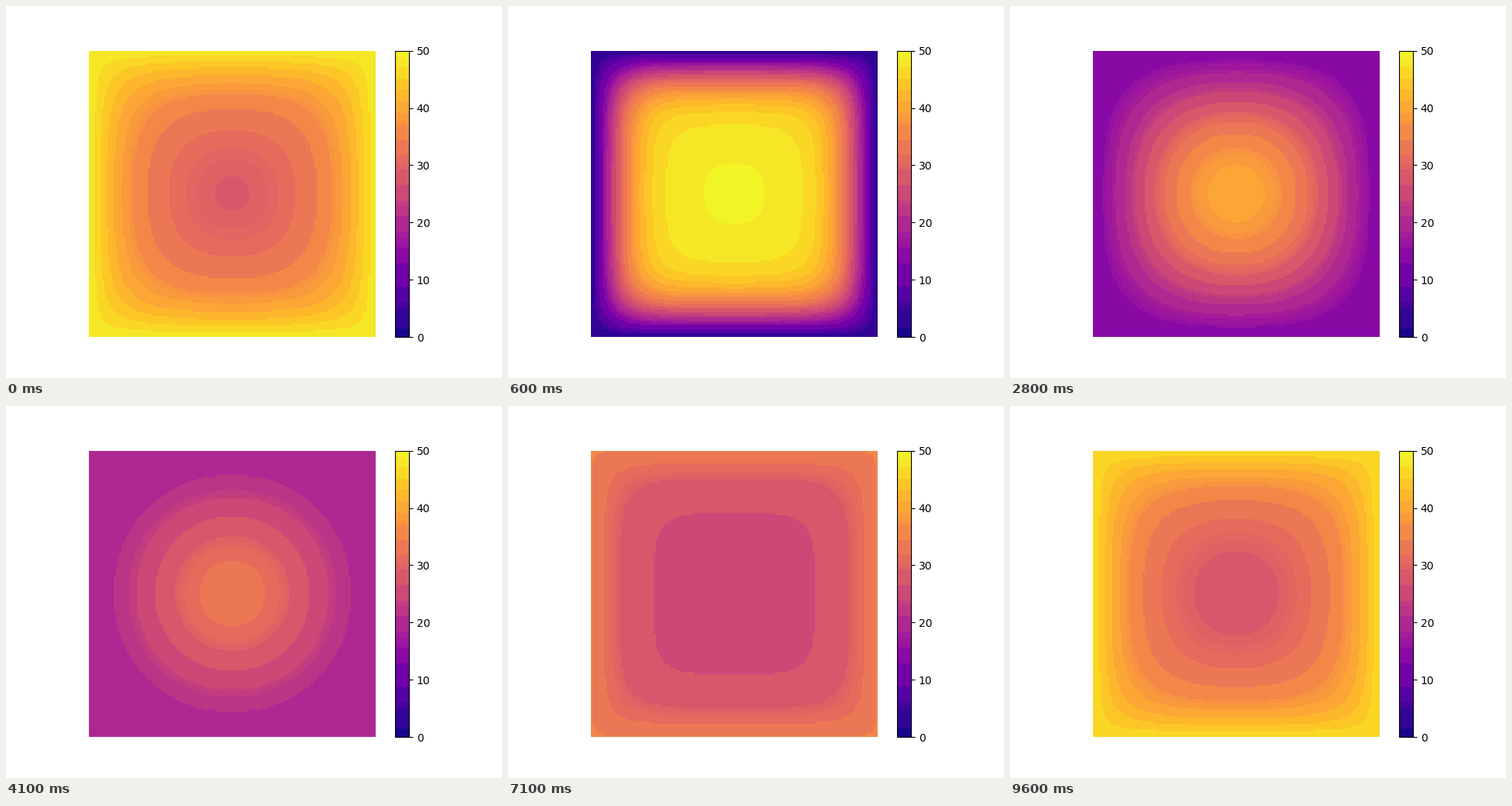
Animation, 640 px wide and 480 px high, one loop 9700 ms. Source, as a matplotlib script:

```python
import numpy as np
import matplotlib.pyplot as plt
from matplotlib.animation import FuncAnimation
from matplotlib.colors import ListedColormap

FRAMES, STEP_MS = 97, 100
CELLS = 150
HOT = 50.0
RAMP = HOT / 102      # rise of the edge temperature per step
DIFF = 0.00113        # diffusivity in plate widths squared per step
DOME = 0.11           # share of the heat that starts as a rounded dome
DOME_AGE = 22         # steps the dome has already diffused

plt.rcParams["font.family"] = "DejaVu Sans"

# Odd sine modes of the square plate
modes = np.arange(1, 100, 2)
x = np.linspace(0, 1, CELLS)
basis = np.sin(np.pi * np.outer(x, modes))
weight = 16 / (np.pi**2 * np.outer(modes, modes))
decay = DIFF * np.pi**2 * (modes[:, None]**2 + modes[None, :]**2)
start = HOT * weight * (1 - DOME + DOME * np.exp(-decay * DOME_AGE))


def plate(step):
    """Temperature of a hot plate whose edge warms up linearly from zero."""
    fade = np.exp(-decay * step)
    lag = RAMP * weight * (1 - fade) / decay
    return RAMP * step + basis @ (start * fade - lag) @ basis.T


def banded_plasma():
    """Plasma in flat bands: shades that share their leading bits merge."""
    rgb = plt.get_cmap("plasma")(np.arange(256))[:, :3]
    keys = (rgb * 255).astype(int) // (32, 16, 32)
    _, band = np.unique(keys, axis=0, return_inverse=True)
    band = band.ravel()
    means = np.array([rgb[band == n].mean(axis=0)
                      for n in range(band.max() + 1)])
    return ListedColormap(means[band])


fig, ax = plt.subplots(figsize=(6.4, 4.8), dpi=100)
image = ax.imshow(plate(1), cmap=banded_plasma(), vmin=0, vmax=HOT,
                  interpolation="nearest")
ax.axis("off")
fig.colorbar(image, ax=ax, ticks=range(0, 51, 10))


def update(i):
    # The loop opens on its hottest edge, then starts over
    image.set_data(plate((i or 100) - 0.5))
    return image,


anim = FuncAnimation(fig, update, frames=FRAMES, interval=STEP_MS,
                     repeat=True, repeat_delay=0)
plt.show()
```
